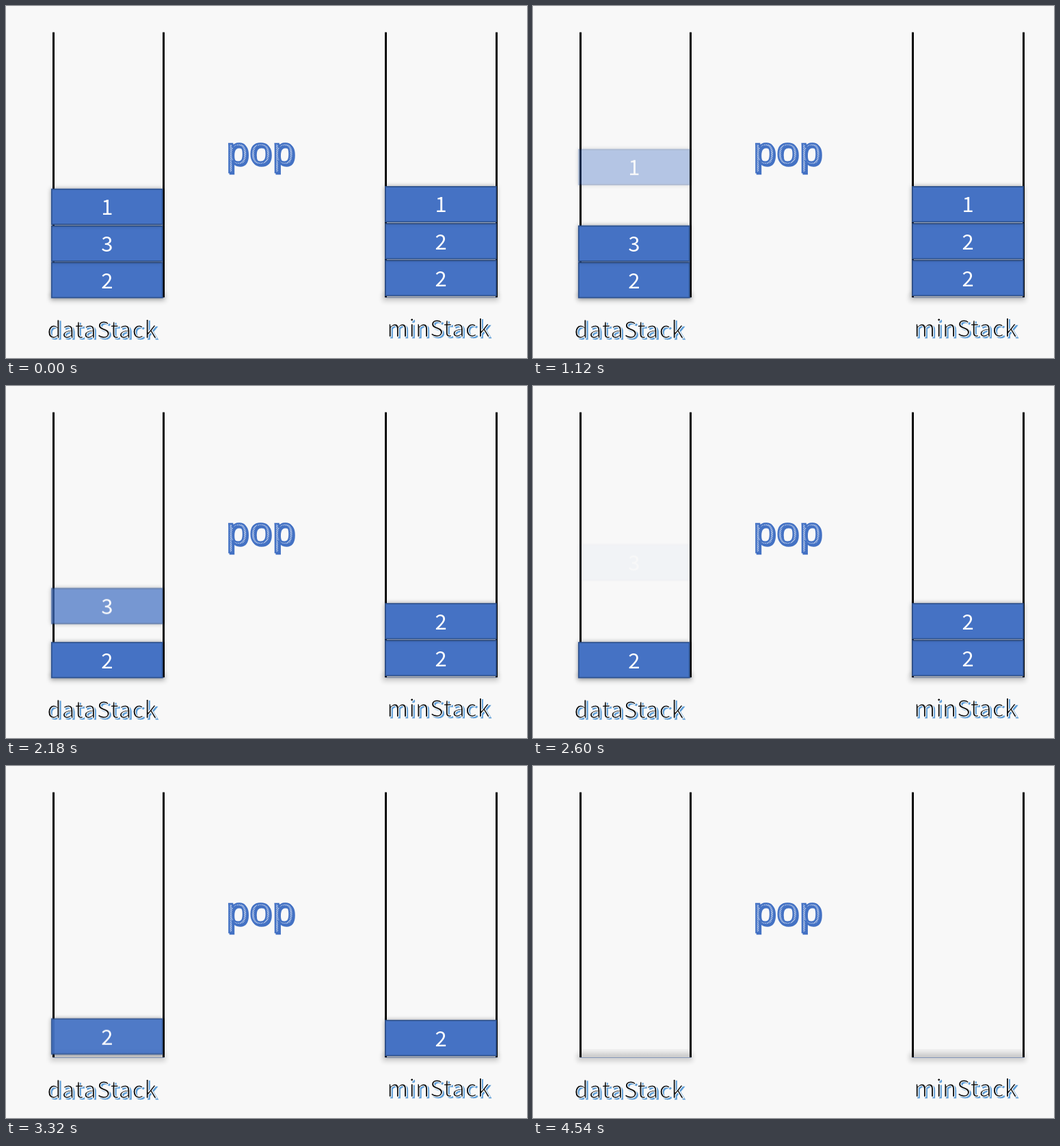
Animation of 762x516 px, one loop 5 s. Source, as an HTML page:

```html
<!DOCTYPE html>
<html lang="en">
<head>
<meta charset="utf-8">
<title>Min stack pop</title>
<style>
  html, body { margin: 0; width: 100%; height: 100%; overflow: hidden; background: #f8f8f8; }
  svg { display: block; width: 762px; height: 516px; }
  .label { font: 34px "Noto Sans CJK SC", "Noto Sans CJK", "Noto Sans", sans-serif; letter-spacing: .4px; }
  .label .under { fill: #5b9bd5; stroke: #5b9bd5; stroke-width: .6; }
  .label .over { fill: #111; stroke: #fff; stroke-width: 1.2; }
  .num { font: 300 31px "Noto Sans CJK SC", "Noto Sans CJK", Lato, sans-serif; fill: #fff; text-anchor: middle; }
  .op { font: 58px "Liberation Sans", Arial, sans-serif; letter-spacing: 1.6px; stroke: #4472c4; stroke-width: 2.4; }
  .wall { stroke: #000; stroke-width: 3; }
  .box { fill: #4472c4; stroke: #2f528f; stroke-width: 1.8; filter: url(#soft); }
</style>
</head>
<body>
<svg viewBox="0 0 762 516" xmlns="http://www.w3.org/2000/svg">
  <defs>
    <filter id="soft" x="-10%" y="-30%" width="120%" height="160%">
      <feDropShadow dx="0" dy="0" stdDeviation="3" flood-color="#000" flood-opacity=".36"/>
    </filter>
    <filter id="blur" x="-10%" y="-150%" width="120%" height="400%">
      <feGaussianBlur stdDeviation="3.6"/>
    </filter>
    <linearGradient id="floor" x1="0" y1="0" x2="0" y2="1">
      <stop offset="0" stop-color="#000" stop-opacity=".03"/>
      <stop offset="1" stop-color="#000" stop-opacity=".03"/>
    </linearGradient>
    <pattern id="hatch" width="2" height="2" patternUnits="userSpaceOnUse" patternTransform="rotate(45)">
      <rect width="2" height="2" fill="#fff"/>
      <rect width="1.2" height="2" fill="#4472c4"/>
    </pattern>
  </defs>
  <g id="scene"></g>
  <g class="op">
    <text x="324" y="234" fill="#4472c4">pop</text>
    <text x="322.4" y="232.4" fill="url(#hatch)">pop</text>
  </g>
</svg>
<script>
const LOOP = 5000, START = 738, STEP = 637, FADE = 612, RISE = 93;
const BOX_W = 162, BOX_H = 51.4;
const stacks = [
  { name: 'dataStack', walls: [69.5, 230.5], left: 66.8, labelX: 60, labelY: 487,
    boxes: [['2', 376.1], ['3', 322.5], ['1', 268.6]] },
  { name: 'minStack', walls: [555.5, 717.5], left: 555, labelX: 557, labelY: 485,
    boxes: [['2', 373.1], ['2', 319.1], ['1', 264.9]] }
];
const scene = document.getElementById('scene');

function add(parent, tag, attrs, text) {
  const el = document.createElementNS('http://www.w3.org/2000/svg', tag);
  for (const key in attrs) el.setAttribute(key, attrs[key]);
  if (text) el.textContent = text;
  return parent.appendChild(el);
}

function drawFrame({ name, walls: [a, b], labelX, labelY }) {
  add(scene, 'rect', { x: a - 5, y: 421, width: b - a + 8, height: 12, fill: '#000', opacity: .16, filter: 'url(#blur)' });
  add(scene, 'rect', { x: a, y: 415, width: b - a, height: 12, fill: 'url(#floor)' });
  add(scene, 'line', { x1: a - 1, x2: b + 1, y1: 427.5, y2: 427.5, stroke: '#8496b8' });
  for (const x of [a, b]) add(scene, 'line', { class: 'wall', x1: x, x2: x, y1: 38.5, y2: 427 });
  const label = add(scene, 'g', { class: 'label' });
  add(label, 'text', { class: 'under', x: labelX + 2.3, y: labelY + 2.3 }, name);
  add(label, 'text', { class: 'over', x: labelX, y: labelY }, name);
}

function drawBox(left, [value, top]) {
  const g = add(scene, 'g', {});
  add(g, 'rect', { class: 'box', x: left, y: top, width: BOX_W, height: BOX_H });
  add(g, 'text', { class: 'num', x: left + BOX_W / 2, y: top + 37.4 }, value);
  return g;
}

function pop(el, turn) {
  const begin = START + turn * STEP;
  const still = { transform: 'translateY(0px)', opacity: 1 };
  const gone = { transform: `translateY(${-RISE}px)`, opacity: 0 };
  el.animate([
    { ...still, offset: 0 },
    { ...still, offset: begin / LOOP },
    { ...gone, offset: (begin + FADE) / LOOP },
    { ...gone, offset: 1 }
  ], { duration: LOOP, iterations: Infinity });
}

// Pops alternate between the stacks, top box first.
stacks.forEach((stack, side) => {
  drawFrame(stack);
  stack.boxes.forEach((box, level) => pop(drawBox(stack.left, box), (2 - level) * 2 + side));
});
</script>
</body>
</html>
```
